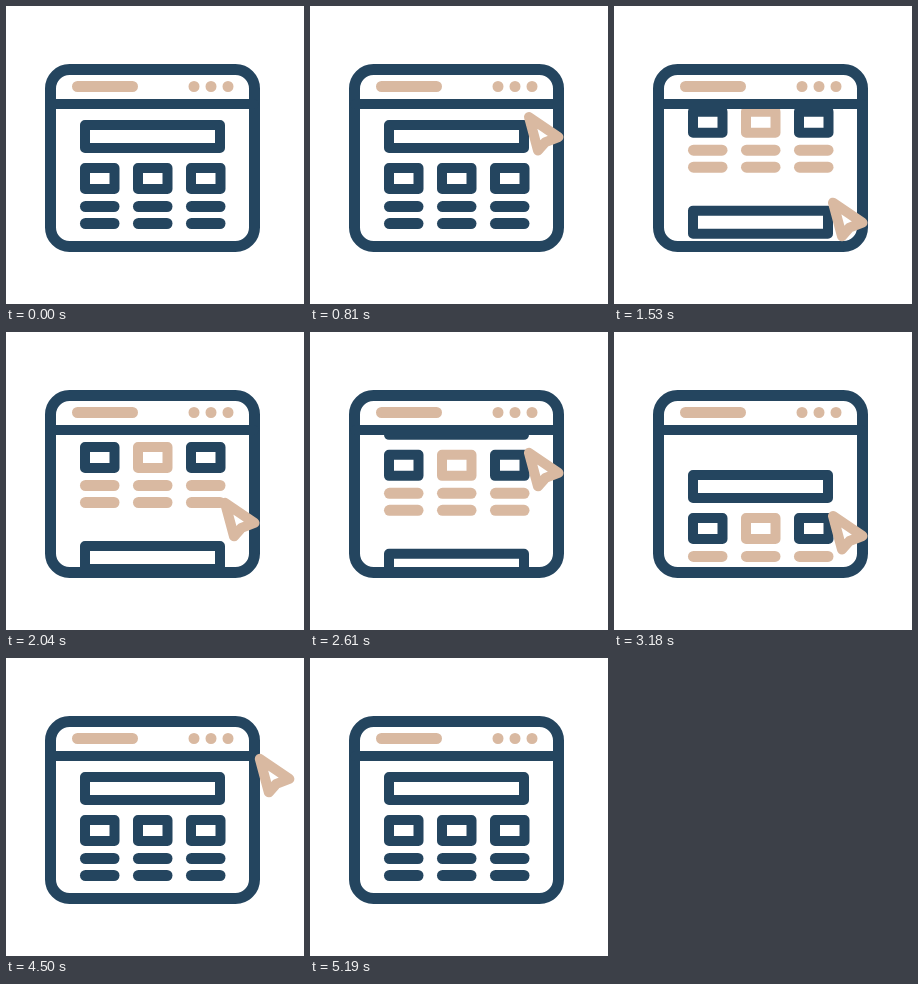
An HTML page that plays this animation: 298 by 298 pixels, repeating every 5310 ms.

```html
<!DOCTYPE html>
<html lang="en">
<head>
<meta charset="utf-8">
<title>Page drag</title>
<style>
html, body { margin: 0; height: 100%; overflow: hidden; background: #fff; }
svg { display: block; width: 298px; height: 298px; fill: none; stroke-linecap: round; stroke-linejoin: round; }
.navy { stroke: #24455f; }
.sand { stroke: #d9b9a1; }
</style>
</head>
<body>
<svg viewBox="0 0 298 298">
  <clipPath id="view"><rect x="45" y="98" width="204" height="143"/></clipPath>
  <g clip-path="url(#view)"><g id="page" stroke-width="10"></g></g>
  <g class="navy">
    <rect x="44.5" y="63.5" width="204" height="177" rx="19" stroke-width="11"/>
    <path d="M45 98H248" stroke-width="10"/>
  </g>
  <path class="sand" stroke-width="11" d="M71.5 80.5H126.5M188 80.5h.01M205 80.5h.01M222 80.5h.01"/>
  <path id="cursor" class="sand" stroke-width="10" d="M5 5L34.5 25L21.5 30L14 38.5Z"/>
</svg>
<script>
const LOOP = 5310, SECTION = 142;
const page = document.getElementById('page');
const cursor = document.getElementById('cursor');

// One page section: a wide bar, three boxes and two rows of lines.
function section(top, middle, lines) {
  const box = (x, y, w, h, tone) =>
    `<rect class="${tone}" x="${x + 5}" y="${y + 5}" width="${w - 10}" height="${h - 10}"/>`;
  const line = (x, y) =>
    `<path class="${lines}" stroke-width="11" d="M${x + 5.5} ${y}h28.5"/>`;
  const columns = [74, 127, 180].map((x, i) =>
    box(x, top + 43, 39.5, 31, i === 1 ? middle : 'navy') +
    line(x, top + 86.5) + line(x, top + 103.5));
  return box(74, top, 145, 33, 'navy') + columns.join('');
}
page.innerHTML = section(114 - SECTION, 'sand', 'sand') + section(114, 'navy', 'navy');

// Easing along a cubic Bezier from (x1, 0) to (x2, 1).
const bezier = (x1, x2) => t => {
  let lo = 0, hi = 1;
  for (let i = 0; i < 24; i++) {
    const s = (lo + hi) / 2, r = 1 - s;
    if (3 * s * r * r * x1 + 3 * s * s * r * x2 + s * s * s < t) lo = s; else hi = s;
  }
  return lo * lo * (3 - 2 * lo);
};
const smooth = bezier(1 / 3, 2 / 3), drag = bezier(.3, .6), settle = bezier(.33, .16);

// Each move: start, end, easing, then the cursor x, cursor y and page scroll reached.
const away = [300, 81, 0];
const moves = [
  [300, 780, smooth, 214, 106, 0],
  [800, 1740, drag, 214, 201, 95],
  [1740, 2460, smooth, 214, 108, 95],
  [2460, 3190, smooth, 214, 179, 166],
  [3425, 4125, settle, 214, 106, 0],
  [4240, 5200, settle, ...away]
];

function poseAt(time) {
  let pose = away;
  for (const [start, end, ease, ...goal] of moves) {
    if (time <= start) break;
    const k = time >= end ? 1 : ease((time - start) / (end - start));
    pose = pose.map((v, i) => v + (goal[i] - v) * k);
  }
  return pose;
}

const origin = performance.now();
function draw() {
  const [x, y, scroll] = poseAt((performance.now() - origin) % LOOP);
  cursor.setAttribute('transform', `translate(${x} ${y})`);
  page.setAttribute('transform', `translate(0 ${scroll})`);
  requestAnimationFrame(draw);
}
draw();
</script>
</body>
</html>
```
